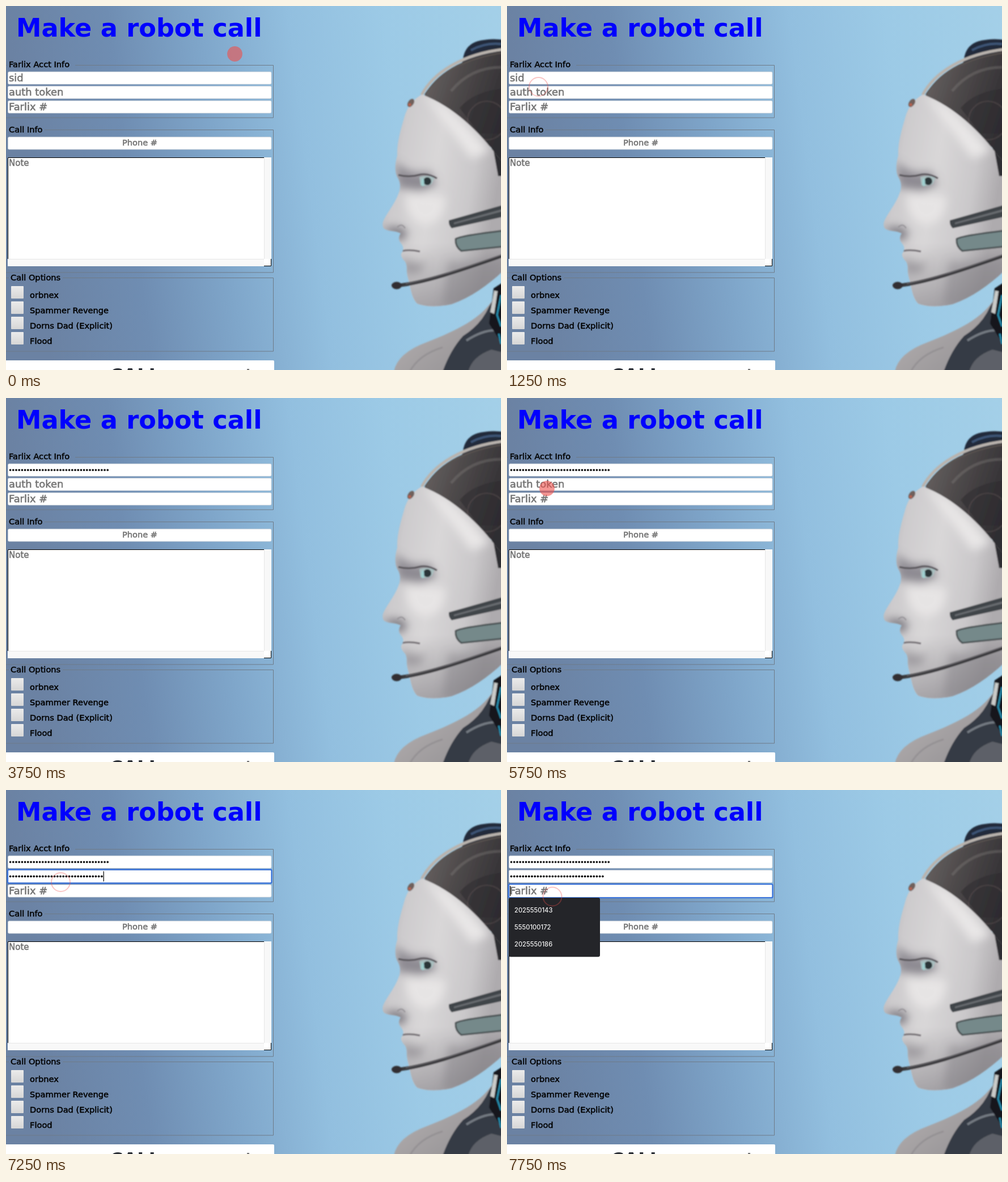
Write an HTML page that moves like this. It is 873 px wide and 642 px high and loops after 8000 ms.

```html
<!DOCTYPE html>
<html lang="en">
<head>
<meta charset="utf-8">
<title>Make a robot call</title>
<style>
  html, body { margin: 0; width: 100%; height: 100%; overflow: hidden; }
  svg { display: block; width: 873px; height: 642px; }
  text { font-family: "DejaVu Sans", sans-serif; white-space: pre; }
  .label { font-size: 14.6px; stroke: #000; stroke-width: .5; }
  .hint { fill: #757575; stroke: #757575; stroke-width: .6; }
  .menu text { font: 500 11.2px Inter, sans-serif; fill: #f1f1f1; }
  .frame { fill: none; stroke: #6f7b88; }
</style>
</head>
<body>
<svg viewBox="0 0 873 642" xmlns="http://www.w3.org/2000/svg">
  <defs>
    <linearGradient id="sky" gradientUnits="userSpaceOnUse" x1="0" y1="0" x2="873" y2="-110">
      <stop offset="0" stop-color="#6b82a3"/>
      <stop offset=".2" stop-color="#6f8db2"/>
      <stop offset=".38" stop-color="#7fa6ca"/>
      <stop offset=".56" stop-color="#92bfdf"/>
      <stop offset=".75" stop-color="#9ccae6"/>
      <stop offset="1" stop-color="#a4d0e8"/>
    </linearGradient>
    <linearGradient id="skin" x1="0" y1="0" x2="1" y2=".3">
      <stop offset="0" stop-color="#aeacb0"/>
      <stop offset=".22" stop-color="#cdcbcd"/>
      <stop offset=".5" stop-color="#d9d7d8"/>
      <stop offset=".8" stop-color="#cac8ca"/>
      <stop offset="1" stop-color="#aeabae"/>
    </linearGradient>
    <linearGradient id="jaw" x1="0" y1="0" x2="0" y2="1">
      <stop offset=".7" stop-color="#77747a" stop-opacity="0"/>
      <stop offset="1" stop-color="#77747a" stop-opacity=".5"/>
    </linearGradient>
    <linearGradient id="skull" x1="0" y1="0" x2="1" y2=".5">
      <stop offset="0" stop-color="#6b6665"/>
      <stop offset=".5" stop-color="#4b4748"/>
      <stop offset="1" stop-color="#2f2d31"/>
    </linearGradient>
    <linearGradient id="shoulder" x1="0" y1="0" x2="1" y2="1">
      <stop offset="0" stop-color="#bdb9b9"/>
      <stop offset="1" stop-color="#8f8c8f"/>
    </linearGradient>
    <linearGradient id="check" x1="0" y1="0" x2="0" y2="1">
      <stop offset="0" stop-color="#ebebeb"/>
      <stop offset="1" stop-color="#d6d6d6"/>
    </linearGradient>
    <filter id="soft" x="-30%" y="-30%" width="160%" height="160%"><feGaussianBlur stdDeviation="8"/></filter>
    <filter id="slight"><feGaussianBlur stdDeviation=".9"/></filter>
    <path id="face" d="M734 156C718 164 707 178 702 198C695 222 689 244 690 264C685 280 686 296 691 303Q697 313 694 326C688 345 677 358 668 374Q661 386 667 393C675 398 687 396 696 401Q690 410 696 418Q704 427 698 435Q694 441 704 451C709 460 705 465 709 480C714 500 715 514 725 525Q748 534 786 526C820 514 850 492 876 468V275L866 264C835 222 790 178 734 156Z"/>
    <clipPath id="inFace"><use href="#face"/></clipPath>
  </defs>

  <rect width="873" height="642" fill="url(#sky)"/>

  <g id="robot" filter="url(#slight)">
    <path d="M807 88Q812 68 832 62Q855 56 880 60V120H800Z" fill="#202a3a"/>
    <path d="M820 78Q845 64 873 67" fill="none" stroke="#3c5476" stroke-width="4"/>
    <path d="M738 158C758 120 800 92 880 78V296H866L856 250Z" fill="url(#skull)"/>
    <path d="M785 150Q820 108 873 108" fill="none" stroke="#8d8786" stroke-width="5" opacity=".3"/>
    <path d="M800 180Q825 150 880 145V225H835Z" fill="#2d2a2e" opacity=".5"/>
    <circle cx="848" cy="202" r="34" fill="none" stroke="#6d5c5e" stroke-width="2" opacity=".4"/>
    <path d="M733 157C754 117 804 85 880 76" fill="none" stroke="#b9b3ad" stroke-width="5"/>
    <path d="M739 156C761 122 806 92 880 82" fill="none" stroke="#5a5350" stroke-width="2"/>

    <path d="M684 645Q690 612 742 593C790 574 832 555 856 522L876 500V645Z" fill="url(#shoulder)"/>
    <path d="M712 645Q728 615 770 602" fill="none" stroke="#8a878a" stroke-width="3" opacity=".6"/>
    <path d="M770 645Q784 606 806 582Q838 562 852 530L880 486V645Z" fill="#363b44"/>
    <path d="M815 645Q822 618 856 606L880 612V645Z" fill="#5d6168"/>
    <path d="M812 590Q840 572 862 572" fill="none" stroke="#737981" stroke-width="4"/>
    <path d="M852 560L860 498L880 485V605Z" fill="#12181f"/>
    <path d="M854 540L861 502L867 503L861 543Z" fill="#c9cbc9"/>
    <path d="M873 510L866 545L873 565M869 578L873 596" fill="none" stroke="#278fb0" stroke-width="3"/>

    <use href="#face" fill="url(#skin)"/>
    <g clip-path="url(#inFace)">
      <use href="#face" fill="url(#jaw)"/>
      <g filter="url(#soft)">
        <path d="M735 155Q800 190 852 256L820 270Q770 200 735 155Z" fill="#e8e6e6"/>
        <path d="M686 272Q706 300 750 292L758 318L728 328L690 320Z" fill="#77757c" opacity=".75"/>
        <path d="M706 330Q700 370 730 385Q775 390 775 335Z" fill="#e6e4e4"/>
        <path d="M664 394Q690 384 708 398L698 416Z" fill="#77747b"/>
        <path d="M698 444Q728 462 742 448L730 472H702Z" fill="#8d8a90" opacity=".7"/>
        <path d="M780 450Q820 456 880 440V530H770Z" fill="#7c797e" opacity=".4"/>
      </g>
      <path d="M860 256L880 268V300H868Z" fill="#2f2e32"/>
      <path d="M729 302Q742 297 756 303L751 314Q739 320 731 316Z" fill="#a9bfc0"/>
      <path d="M692 298Q712 303 732 297Q746 295 760 304" fill="none" stroke="#565358" stroke-width="3"/>
      <ellipse cx="743" cy="309" rx="7" ry="7" fill="#293439"/>
      <ellipse cx="735" cy="311" rx="2.5" ry="7" fill="#9fd0d0"/>
      <path d="M699 432Q712 429 730 433" fill="none" stroke="#706b70" stroke-width="3"/>
      <path d="M690 390Q698 382 704 392" fill="none" stroke="#928f94" stroke-width="2"/>
    </g>
    <ellipse cx="714" cy="171" rx="5" ry="8" fill="#70605b" transform="rotate(35 714 171)"/>
    <circle cx="712" cy="174" r="2.5" fill="#b9604d"/>

    <path d="M781 378L880 350V371L786 392Q780 386 781 378Z" fill="#414448"/>
    <path d="M790 382L880 357V361L790 385Z" fill="#686c70"/>
    <path d="M793 411Q800 405 880 396V424L803 432Q792 424 793 411Z" fill="#75898a" stroke="#4a5153" stroke-width="3"/>
    <path d="M690 493C735 489 800 467 880 439" fill="none" stroke="#39383b" stroke-width="6"/>
    <path d="M705 490C750 483 810 461 880 437" fill="none" stroke="#67656a" stroke-width="1.5"/>
    <ellipse cx="689" cy="493" rx="9" ry="6.5" fill="#302d30"/>
  </g>

  <text x="18" y="53.5" font-size="44.6" font-weight="700" fill="#00f">Make a robot call</text>

  <path class="frame" d="M0 104.5H2M122 104.5H471.5V197H0M0 218.5H2M68 218.5H471.5V470H0M0 479.5H5M100 479.5H471.5V609H0"/>
  <g id="form"></g>

  <rect x="3" y="267" width="465" height="192" fill="#fff"/>
  <path d="M456 267H468V446H456ZM3 447H455V459H3Z" fill="#f8f8f8"/>
  <path d="M455.5 267V446M3 446.5H455" stroke="#e6e6e6"/>
  <path d="M3.5 446V267.5H455M467.5 446V458.5H455" fill="none" stroke="#000"/>
  <text class="hint" x="5" y="282" font-size="15">Note</text>

  <rect x="-4" y="625" width="477" height="30" rx="2" fill="#fff"/>
  <text x="183" y="662" font-size="32" font-weight="700" fill="#2b2f36">CALL</text>
  <rect x="425" y="640" width="4" height="2" fill="#777"/>

  <g id="dots"></g>
  <rect id="focus" x="3" width="465.5" height="24" rx="2" fill="none" stroke="#3872dc" stroke-width="2.2"/>
  <rect id="caret" width="1.2" height="18" fill="#000"/>
  <g id="menu" class="menu">
    <rect x="3" y="191" width="161" height="104" rx="4" fill="#000" opacity=".25"/>
    <rect x="3" y="190" width="161" height="104" rx="3" fill="#242529"/>
    <text x="13" y="216">2025550143</text>
    <text x="13" y="246">5550100172</text>
    <text x="13" y="276">2025550186</text>
  </g>
  <circle id="pointer"/>
</svg>
<script>
  const LOOP = 8000;
  const $ = id => document.getElementById(id);
  const set = (el, attrs) => {
    for (const key in attrs) el.setAttribute(key, attrs[key]);
  };
  const show = (el, on) => set(el, { visibility: on ? "visible" : "hidden" });

  const fieldTop = [116, 141.3, 167];
  const label = (x, y, s) => `<text class="label" x="${x}" y="${y}">${s}</text>`;
  const input = y => `<rect x="3.5" y="${y}" width="464.5" height="22" rx="2" fill="#fff" stroke="#c3ccd5" stroke-width=".8"/>`;
  const checkbox = (name, i) => {
    const y = 494 + 27 * i;
    return `<rect x="9" y="${y}" width="22" height="22" rx="1" fill="url(#check)"/>` +
      label(42, y + 21.3, name);
  };

  $("form").innerHTML =
    label(5, 108, "Farlix Acct Info") + label(5, 222.5, "Call Info") + label(8, 484, "Call Options") +
    [...fieldTop, 231].map(input).join("") +
    ["sid", "auth token", "Farlix #"].map((s, i) =>
      `<text class="hint" id="hint${i}" x="5" y="${fieldTop[i] + 16.5}" font-size="17.9">${s}</text>`).join("") +
    `<text class="hint" x="236" y="246" font-size="14.6" text-anchor="middle">Phone #</text>` +
    ["orbnex", "Spammer Revenge", "Dorns Dad (Explicit)", "Flood"].map(checkbox).join("");

  const secrets = [{ count: 34, from: 2500 }, { count: 32, from: 7250 }];
  const dotRow = ({ count }, row) => {
    const circles = Array.from({ length: count }, (_, i) =>
      `<circle cx="${(7.6 + 5.2 * i).toFixed(1)}" cy="${fieldTop[row] + 11}" r="1.85"/>`);
    return `<g id="secret${row}">${circles.join("")}</g>`;
  };
  $("dots").innerHTML = secrets.map(dotRow).join("");

  // Each entry: start time, then the values that hold until the next entry.
  const pointerSteps = [
    [0, "dot", 403.5, 84.5], [250, "dot", 225.5, 140.5], [500, "dot", 138.5, 153.5],
    [750, "ring", 90.5, 159.5], [1000, "ring", 57, 144.5], [1250, "ring", 55.5, 142.5],
    [1500, "ring", 54.5, 144.5], [1750, "ring", 54.5, 147], [2000, "dot", 54.5, 133.5],
    [2500, "dot", 56.5, 139.5], [3000, ""], [5750, "dot", 70.5, 159.5],
    [6000, "ring", 83.5, 156.5], [6250, "ring", 93, 159.5], [6500, "ring", 95.5, 158.5],
    [6750, "ring", 97.5, 160.5], [7000, "ring", 96.5, 161.5], [7250, "ring", 96.5, 162.5],
    [7500, "dot", 80, 175.5], [7750, "ring", 80, 188]
  ];
  const focusSteps = [[0, -1], [1500, 0], [3750, -1], [6250, 0], [6500, 1], [7750, 2]];
  const caretSteps = [
    [0, false], [1500, true], [1750, false], [2250, true], [3000, false], [3500, true],
    [3750, false], [6500, true], [7000, false], [7250, true]
  ];
  const at = (steps, t) => steps.findLast(step => step[0] <= t).slice(1);

  const looks = {
    dot: { r: 13.4, fill: "rgba(238,80,75,.6)", stroke: "none" },
    ring: { r: 16.5, fill: "none", stroke: "rgba(238,80,75,.32)", "stroke-width": 2 }
  };

  function render(t) {
    const [kind, cx, cy] = at(pointerSteps, t);
    show($("pointer"), kind);
    if (kind) set($("pointer"), { cx, cy, ...looks[kind] });

    secrets.forEach(({ from }, i) => {
      show($("secret" + i), t >= from);
      show($("hint" + i), t < from);
    });

    const [field] = at(focusSteps, t);
    const [blink] = at(caretSteps, t);
    show($("focus"), field >= 0);
    show($("caret"), field >= 0 && blink);
    if (field >= 0) {
      const secret = secrets[field];
      const x = secret && t >= secret.from ? 5.2 + 5.2 * secret.count : 5;
      set($("focus"), { y: fieldTop[field] - 1 });
      set($("caret"), { x, y: fieldTop[field] + 2 });
    }
    show($("menu"), t >= 7750);
  }

  const start = performance.now();
  function tick() {
    render((performance.now() - start) % LOOP);
    requestAnimationFrame(tick);
  }
  tick();
</script>
</body>
</html>
```
